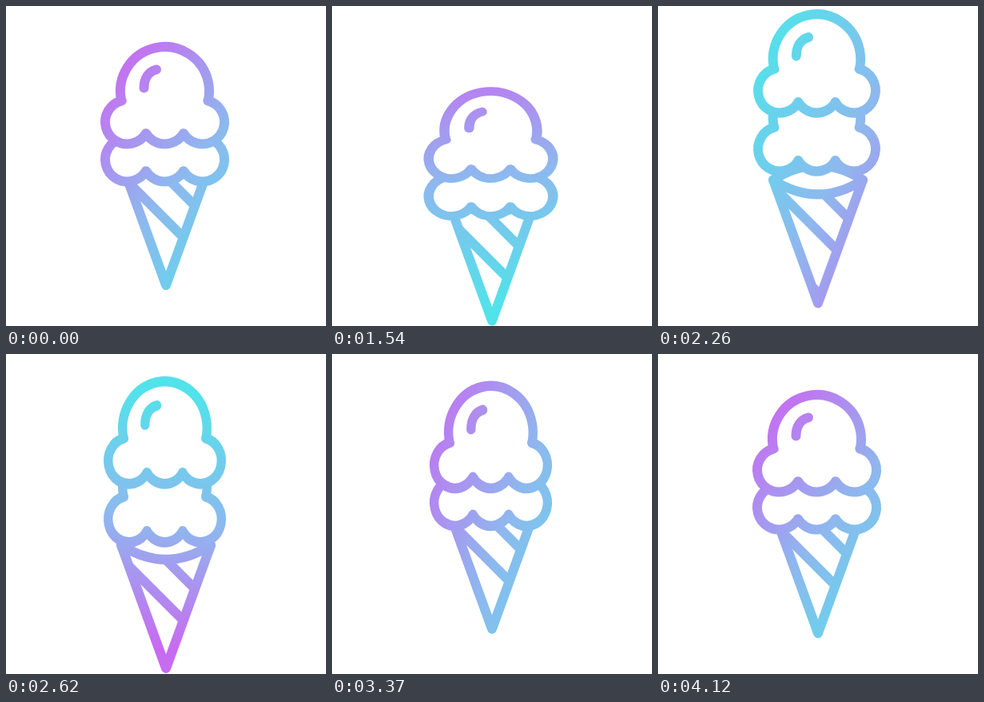
Write an HTML page with a canvas that moves like this. It is 400x400 px and loops after 4150 ms.

```html
<!DOCTYPE html>
<html lang="en">
<head>
<meta charset="utf-8">
<title>Ice cream</title>
<style>
  html, body { margin: 0; width: 100%; height: 100%; overflow: hidden; background: #fff; }
  canvas { display: block; width: 400px; height: 400px; }
</style>
</head>
<body>
<canvas id="stage"></canvas>
<script>
const LOOP = 4150;
const SIZE = 400;
const STROKE = 12;
const STRIPE_GAP = 54;
const DEG = Math.PI / 180;

// The scoops leave the cone at TOSS and turn back down at PEAK.
const TOSS = 1560, PEAK = 2140;

// Key points as [time, value], joined by sine easing.
const CONE_TIP = [[1030, 349], [1580, 394], [2140, 368], [2640, 393], [3430, 343], [4120, 349]];
const SQUASH = [[1030, 0], [1700, .05], [2650, -.05], [3300, -.05], [4120, 0]];

const canvas = document.getElementById('stage');
const ctx = canvas.getContext('2d');
const ratio = window.devicePixelRatio || 1;
canvas.width = canvas.height = SIZE * ratio;

const clamp01 = v => Math.min(1, Math.max(0, v));
const easeSine = v => (1 - Math.cos(Math.PI * clamp01(v))) / 2;

function follow(points, time) {
  let value = points[0][1];
  for (let i = 1; i < points.length; i++) {
    const [t0, v0] = points[i - 1], [t1, v1] = points[i];
    value += (v1 - v0) * easeSine((time - t0) / (t1 - t0));
  }
  return value;
}

// A scoop rests on the cone unless its flight carries it higher.
function scoopY(time, seat, top) {
  const rest = follow(CONE_TIP, time) - seat;
  if (time < TOSS) return rest;
  const start = follow(CONE_TIP, TOSS) - seat;
  const flight = time < PEAK
    ? top + (start - top) * ((PEAK - time) / (PEAK - TOSS)) ** 2
    : top + 30 * ((time - PEAK) / 480) ** 2;
  return Math.min(rest, flight);
}

function makeScoop() {
  const path = new Path2D();
  const r = 27.5, y = 145;
  path.arc(198.5, 106.5, 55.5, 167.5 * DEG, 372.5 * DEG);
  path.arc(245.5, y, r, -75.7 * DEG, 149 * DEG);
  path.arc(198.5, y, r, 31 * DEG, 149 * DEG);
  path.arc(151.5, y, r, 31 * DEG, 255.7 * DEG);
  path.closePath();
  return path;
}

const scoop = makeScoop();
const shine = new Path2D('M172.5 102.5C172.5 91 178 82 188 79.5');
const cone = new Path2D('M144 0Q200 36 256 0L200 154Z');
const rim = new Path2D('M144 0Q200 -36 256 0');

function drawCone(tip, spin) {
  ctx.save();
  ctx.translate(0, tip - 154);
  ctx.save();
  ctx.clip(cone);
  ctx.beginPath();
  for (let n = 0; n < 3; n++) {
    // The lowest stripe speeds up and runs off past the tip.
    const extra = n === 2 ? STRIPE_GAP * spin ** 5 : 0;
    const shift = STRIPE_GAP * (n + spin - 1) - 181.5 + extra;
    ctx.moveTo(100, 100 + shift);
    ctx.lineTo(300, 300 + shift);
  }
  ctx.stroke();
  ctx.restore();
  ctx.stroke(cone);
  ctx.stroke(rim);
  ctx.restore();
}

function drawScoop(y, squash, shiny) {
  ctx.save();
  ctx.translate(198.5, y);
  ctx.scale(1 + squash, 1 - squash * (squash > 0 ? 2.4 : 1.1));
  ctx.translate(-198.5, -159);
  ctx.globalCompositeOperation = 'destination-out';
  ctx.fill(scoop);
  ctx.globalCompositeOperation = 'source-over';
  ctx.stroke(scoop);
  if (shiny) ctx.stroke(shine);
  ctx.restore();
}

// Tints the line art with a gradient that makes one full turn.
function tint(time) {
  const turn = easeSine(clamp01((time - 1030) / 2800) ** .9);
  const angle = (41 + 360 * turn) * DEG;
  const cx = 222, cy = 210, reach = 158;
  const dx = Math.cos(angle) * reach, dy = Math.sin(angle) * reach;
  const colours = ctx.createLinearGradient(cx - dx, cy - dy, cx + dx, cy + dy);
  ['#c76cf1', '#8db9ee', '#52e2ea'].forEach((c, i) => colours.addColorStop(i / 2, c));
  ctx.globalCompositeOperation = 'source-in';
  ctx.fillStyle = colours;
  ctx.fillRect(0, 0, SIZE, SIZE);
  ctx.globalCompositeOperation = 'destination-over';
  ctx.fillStyle = '#fff';
  ctx.fillRect(0, 0, SIZE, SIZE);
}

function draw(time) {
  const squash = follow(SQUASH, time);
  ctx.setTransform(ratio, 0, 0, ratio, 0, 0);
  ctx.globalCompositeOperation = 'source-over';
  ctx.clearRect(0, 0, SIZE, SIZE);
  ctx.fillStyle = ctx.strokeStyle = '#000';
  ctx.lineWidth = STROKE;
  ctx.lineCap = ctx.lineJoin = 'round';
  drawCone(follow(CONE_TIP, time), easeSine((time - 1150) / 1500));
  drawScoop(scoopY(time, 143, 191), squash, false);
  drawScoop(scoopY(time, 190, 118), squash, true);
  tint(time);
}

const start = performance.now();
function tick() {
  draw((performance.now() - start) % LOOP);
  requestAnimationFrame(tick);
}
tick();
</script>
</body>
</html>
```
